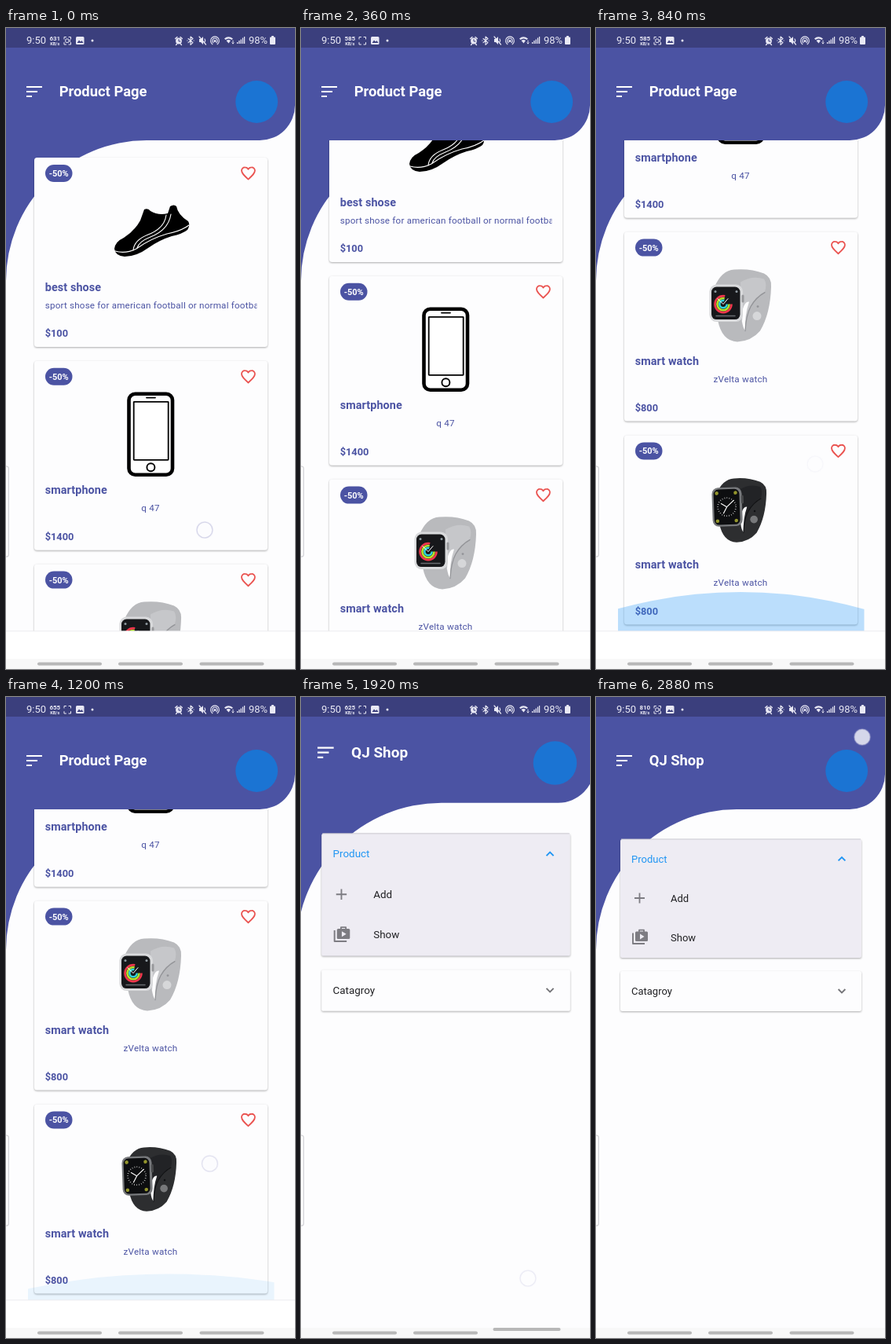
Animation of 368x816 px, one loop 3000 ms. Source, as an HTML page:

```html
<!DOCTYPE html>
<html lang="en">
<head>
<meta charset="utf-8">
<title>Shop app</title>
<style>
html, body { margin: 0; width: 100%; height: 100%; overflow: hidden; background: #fdfdfe; }
svg { display: block; width: 368px; height: 816px; font-family: Roboto, sans-serif; }
.b { font-weight: 700; }
.ink { fill: #4b53a3; }
.note { letter-spacing: .2px; }
.name { letter-spacing: .1px; }
.line { fill: none; stroke-linecap: round; stroke-linejoin: round; }
.raised { filter: drop-shadow(0 1.5px 1.2px rgba(0,0,0,.32)); }
</style>
</head>
<body>
<svg id="stage" viewBox="0 0 368 816"></svg>
<script>
const STEP = 120, LOOP = 3000, PITCH = 258.8;
const INDIGO = '#4b53a3', PAPER = '#fdfdfe';

const text = (x, y, size, s, attrs = '') => `<text x="${x}" y="${y}" font-size="${size}" ${attrs}>${s}</text>`;
const rect = (x, y, w, h, r, attrs = '') => `<rect x="${x}" y="${y}" width="${w}" height="${h}" rx="${r}" ${attrs}/>`;
const disc = (x, y, r, attrs = '') => `<circle cx="${x}" cy="${y}" r="${r}" ${attrs}/>`;
const line = (d, color, w, attrs = '') => `<path d="${d}" class="line" stroke="${color}" stroke-width="${w}" ${attrs}/>`;

const header = title => `
  <rect width="368" height="330" fill="${INDIGO}"/>
  <path d="M0 322A179 179 0 0 1 179 143H323.200A44.800 44.800 0 0 0 368 98.200V816H0Z" fill="${PAPER}"/>
  <path d="M26 75H46M26 81H40M26 87H33" stroke="#fff" stroke-width="2.2"/>
  ${text(67.7, 87, 18.4, title, 'class="b" fill="#fff"')}
  ${disc(319.2, 94, 26.9, 'fill="#1b74d3"')}`;

// Product pictures, in card coordinates
const shoe = `
  <path d="M138 116Q139 107 150 102Q164 93 171 80L176 66Q181 64 184 68Q194 74 206 71L209 62Q214 59 217 62
    Q219 73 232 81Q235 86 231 92Q225 97 211 100Q195 105 181 115Q166 126 151 126Q139 125 138 116Z"/>
  ${line('M139 119Q152 123 166 116Q184 103 205 97Q222 94 233 86', '#fff', 1.2)}
  ${line('M162 118Q163 105 181 98Q202 90 204 73M167 115Q169 107 184 101Q207 92 210 72', '#fff', 1.1)}`;

const phone = `
  ${rect(156.5, 42, 55.5, 103, 8, 'fill="#fff" stroke="#000" stroke-width="4.6"')}
  ${rect(162.7, 52, 44, 74, .5, 'fill="#fff" stroke="#000" stroke-width="1.8"')}
  ${line('M179 46.8H190', '#000', 1.8)}
  ${disc(184.4, 135.5, 5, 'fill="none" stroke="#000" stroke-width="1.9"')}`;

const strap = (main, inner, edge, pin) => `
  <path d="M151 70Q160 49 176 48Q196 46 214 53Q224 58 223 70Q222 104 209 126Q198 139 180 140Q160 139 155 112Z" fill="${main}"/>
  <path d="M184 64Q199 55 214 60Q218 66 215 76Q203 82 196 96Q190 109 190 122L185 114Z" fill="${inner}"/>
  <path d="M187 98Q190 88 195 89Q189 106 190 126Q187 122 186 114Z" fill="${PAPER}"/>
  ${line('M190 126Q191 106 197 95Q204 83 215 77', edge, 1.2)}
  ${disc(205, 107, 5.5, `fill="${pin}"`)}${disc(206, 95, 1.4, `fill="${edge}"`)}`;

const ring = (r, color) => disc(162, 92, r, `fill="none" stroke="${color}" stroke-width="2.6" stroke-dasharray="${r * 4.9} 99"`);
const silverWatch = `
  ${strap('#b9babd', '#c6c7ca', '#929397', '#d6d7d9')}
  ${rect(144.5, 67, 42.5, 47.5, 9, 'fill="#d9dadc"')}
  ${rect(147, 70, 36.5, 41.5, 6.5, 'fill="#17181b"')}
  ${ring(10.5, '#f0364c')}${ring(7.6, '#b5e32c')}${ring(4.7, '#2fd5dc')}
  ${line('M155 85L162 92L168 85', '#fff', 1)}
  ${disc(152, 76, 1.5, 'fill="#8f9aa0"')}${disc(179, 76, 1.5, 'fill="#8f9aa0"')}
  ${line('M153 107H177', '#686b70', 1.5)}
  ${rect(185.5, 80, 3, 10, 1.5, 'fill="#999a9d"')}`;

const blackWatch = `<g transform="translate(19.7 12.5) scale(.885)">
  ${strap('#2d2e30', '#222326', '#111214', '#77787a')}
  <g transform="rotate(-2 166 89)">
  ${rect(145, 61, 43, 56, 9, 'fill="#77797c"')}
  ${rect(147.5, 63.5, 37, 51, 7, 'fill="#0d0e10"')}
  ${disc(166, 89, 13, 'fill="none" stroke="#d8d8d8" stroke-width="2" stroke-dasharray=".8 2.6"')}
  ${line('M158 84L166 89L176 80M166 89L161 98', '#fff', 1.3)}
  ${[[152, 69], [179, 69], [152, 109], [179, 109]].map(([x, y]) => disc(x, y, 2.6, 'fill="#94962c"')).join('')}
  ${rect(187, 73, 3.4, 12, 1.7, 'fill="#48494b"')}
  </g></g>`;

const heart = `<g transform="translate(297.2 8.6) scale(.94)">${line(
  'M12 20.3C6 14.8 3 12 3 8.5A4.4 4.4 0 0 1 7.5 4C9.6 4 11.2 5 12 6.6C12.8 5 14.4 4 16.5 4A4.4 4.4 0 0 1 21 8.5C21 12 18 14.8 12 20.3Z',
  '#ea5350', 1.9)}</g>`;

const card = ([name, note, price, art], i) => `<g transform="translate(0 ${165 + i * PITCH})">
  ${rect(36, 0, 297, 241, 3.5, `class="raised" fill="${PAPER}"`)}
  ${rect(50, 9, 34.5, 22, 11, `fill="${INDIGO}"`)}
  ${text(67.2, 24, 11, '-50%', 'class="b" fill="#fff" text-anchor="middle"')}
  ${heart}${art}
  ${text(49.7, 169.5, 14.4, name, 'class="b ink name"')}
  ${note.length > 20
    ? `<g clip-path="url(#note)">${text(49.7, 191.7, 11.65, note, 'class="ink note"')}</g>`
    : text(184, 191.7, 11.65, note, 'class="ink note" text-anchor="middle"')}
  ${text(49.7, 228.3, 12.8, price, 'class="b ink"')}</g>`;

const goods = [
  ['best shose', 'sport shose for american football or normal football', '$100', shoe],
  ['smartphone', 'q 47', '$1400', phone],
  ['smart watch', 'zVelta watch', '$800', silverWatch],
  ['smart watch', 'zVelta watch', '$800', blackWatch]
];

const productPage = `<g id="products">${header('Product Page')}
  <g clip-path="url(#view)"><g id="list">${goods.map(card).join('')}</g>
  <ellipse id="glow" rx="580" fill="#2196f3"/></g>
  <rect y="768" width="368" height="48" fill="#fff"/>
  <path d="M0 767.8H368" stroke="#ededf0"/></g>`;

const homePage = `<g id="home">${header('QJ Shop')}
  ${rect(31, 181, 307, 151, 2.5, 'class="raised" fill="#eeecf3"')}
  <path d="M32 181H337" stroke="#c9c8d0" stroke-width=".9"/>
  ${text(45, 210.7, 13, 'Product', 'fill="#2196f3"')}
  ${line('M308.6 208.4L313 204L317.4 208.4', '#2196f3', 1.9, 'style="stroke-linecap:butt;stroke-linejoin:miter"')}
  <path d="M49 256H62M55.500 249.500V262.500" stroke="#7d7c82" stroke-width="1.8"/>
  ${text(95, 260.500, 13, 'Add', 'fill="#212124"')}
  ${line('M47 300.500V314H62', '#7d7c82', 1.9, 'style="stroke-linecap:butt"')}
  ${rect(50, 298.5, 16, 12.5, 1.5, 'fill="#7d7c82"')}
  ${line('M55 299V296.700H61V299', '#7d7c82', 1.8)}
  <path d="M56 301.500V308.500L61.500 305Z" fill="#eeecf3"/>
  ${text(95, 310.500, 13, 'Show', 'fill="#212124"')}
  ${rect(31, 349, 307, 51, 2.5, `class="raised" fill="${PAPER}"`)}
  ${text(45, 378.5, 13, 'Catagroy', 'fill="#212124"')}
  ${line('M308.6 372L313 376.400L317.4 372', '#757579', 1.9, 'style="stroke-linecap:butt;stroke-linejoin:miter"')}</g>`;

const pale = '#e9e9f5';
const statusBar = `<rect width="368" height="25" fill="#3b3f7d"/>
  <g fill="${pale}">
  ${text(26, 20.3, 13, '9:50')}
  ${text(62.3, 15.8, 8, '', 'id="speed" class="b" text-anchor="middle"')}
  ${text(62.3, 22.3, 5.6, 'KB/s', 'class="b" text-anchor="middle"')}
  ${rect(89, 11, 10.500, 10, 1.5)}
  <path d="M90.500 19L93 15.500L95 17.500L96.500 16L98.500 19Z" fill="#3b3f7d"/>
  ${disc(110, 16, 1.5)}
  ${disc(220, 16.5, 3.9)}
  <path d="M246 14H248L251 11V21L248 18H246Z"/>
  ${disc(266, 16.5, 1.6)}
  <path d="M278 13.500Q283 9 289 13.500L287.500 15Q283.500 12 279.500 15ZM280.500 16Q283.500 14 286 16L283.500 19.500Z"/>
  <path d="M294 20V18H295.300V20ZM296.300 20V16H297.600V20ZM298.600 20V14.500H299.900V20ZM300.900 20V12.500H302.200V20ZM303 20V11H304.200V20Z"/>
  ${text(309, 20.3, 13, '98%')}
  ${rect(336, 11.5, 7, 9.5, 1)}${rect(338, 10, 3, 2, .5)}
  </g>
  ${line('M74 14V11.500H76.500M80 11.500H82.500V14M82.500 18.500V21H80M76.500 21H74V18.500', pale, 1)}
  <g id="rec">${rect(75.8, 14, 4, 4.4, .8, `fill="none" stroke="${pale}"`)}${line('M81.300 15V17.500', pale, 1)}</g>
  ${line('M215.600 13.500L218 11.500M222 11.500L224.400 13.500M217.500 20.500L216.500 21.500M222.500 20.500L223.500 21.500', pale, 1.3)}
  ${line('M220 14.500V17H222', '#3b3f7d', 1)}
  ${line('M232 13.500L238 18.700L235 21.300V11L238 13.500L232 18.700M230.800 16H231M239 16H239.200', pale, 1.1)}
  ${line('M246 11L254.500 21M253 14Q254.500 16 253 18', pale, 1.2)}
  ${line('M262.900 20.700A5.400 5.400 0 1 1 269.100 20.700M264 18.700A3.200 3.200 0 1 1 268 18.700', pale, 1.1)}
  ${line('M289 16V20M287.800 18.800L289 20L290.200 18.800', pale, .9)}`;

const navBar = `<rect y="803" width="368" height="13" fill="#f8f8f8"/>
  ${rect(40, 807.6, 82, 4, 2, 'fill="#b8b8b8"')}${rect(143, 807.6, 82, 4, 2, 'fill="#b8b8b8"')}
  <rect id="back" height="4" rx="2" fill="#b8b8b8"/>`;

const stage = document.getElementById('stage');
stage.innerHTML = `<defs>
  <clipPath id="view"><rect x="28" y="143" width="313.500" height="625"/></clipPath>
  <clipPath id="note"><rect x="49" y="175" width="270.500" height="30"/></clipPath></defs>
  ${homePage}${productPage}${navBar}${statusBar}
  ${rect(-6, 558, 9.3, 115, 2.5, 'fill="#fff" stroke="#cfcfd4" stroke-width="1.2"')}
  <g id="touch">${disc(0, 0, 11.2, 'fill="#b9b9e0" opacity=".14"')}
  ${disc(0, 0, 9.9, 'fill="#fff" fill-opacity=".75" stroke="#bcbcda" stroke-opacity=".55" stroke-width="1.3"')}</g>`;

const el = {};
stage.querySelectorAll('[id]').forEach(n => el[n.id] = n);
const set = (n, attrs) => { for (const k in attrs) n.setAttribute(k, attrs[k]); };

// Interpolates rows of [step, ...values]; holds the last row.
function track(rows, s) {
  let i = rows.findIndex(r => r[0] > s);
  if (i < 0) return rows[rows.length - 1].slice(1);
  if (i === 0) return rows[0].slice(1);
  const a = rows[i - 1], b = rows[i], k = (s - a[0]) / (b[0] - a[0]);
  return a.slice(1).map((v, j) => v + (b[j + 1] - v) * k);
}

const scroll = [[0, 0], [1, 22], [2, 66], [3, 108], [4, 131], [5, 142], [6, 262], [7, 423]];
const glow = [[6, 0, 0, 184], [7, 50, .3, 184], [9, 26, .06, 190], [10, 33.5, .09, 207], [11, 29, .05, 210], [12, 0, 0, 210]];
const zoom = [[15, 1.05], [16, 1.0315], [17, 1.003], [18, 1]];
// Each swipe: step, x, y, opacity
const swipes = [
  [[0, 253, 639, 1], [1, 255, 617, 1], [2, 259, 585, .75]],
  [[5, 254, 645, 1], [6, 265, 597, .9], [7, 279, 555, .15]],
  [[9, 256, 640, 1], [10, 259.5, 594, .7], [11, 268, 545, .2]],
  [[15, 288, 788, 1], [16, 289, 740, .45]],
  [[22, 346, 195, 1], [23, 343, 115, 1], [24, 339, 51, 1]]
];
const speeds = [[0, 631], [2, 585], [9, 655], [15, 625], [20, 810]];
// Steps in which the recording icon blinks on
const blinks = [[0, 1], [5, 7], [12, 14], [20, 24]];

function draw(ms) {
  const s = Math.floor(ms % LOOP / STEP);
  const home = s >= 16;
  el.products.style.display = home ? 'none' : '';
  el.home.style.display = home ? '' : 'none';
  el.list.setAttribute('transform', `translate(0 ${-track(scroll, s)[0]})`);

  const [h, alpha, cx] = track(glow, s), ry = 11.6 * h;
  set(el.glow, { cx, cy: 768 - h + ry, ry, opacity: alpha });

  const z = track(zoom, s)[0];
  el.home.setAttribute('transform', `translate(184 408) scale(${z}) translate(-184 -408)`);

  const pressed = s === 15 || s === 16;
  set(el.back, pressed ? { x: 244.5, y: 803, width: 86 } : { x: 246.5, y: 807.6, width: 82 });

  const swipe = swipes.find(w => s >= w[0][0] && s <= w[w.length - 1][0]);
  el.touch.style.display = swipe ? '' : 'none';
  if (swipe) {
    const [x, y, opacity] = track(swipe, s);
    set(el.touch, { transform: `translate(${x} ${y})`, opacity });
  }
  el.speed.textContent = speeds.filter(r => r[0] <= s).pop()[1];
  el.rec.style.display = blinks.some(([a, b]) => s >= a && s <= b) ? '' : 'none';
}

const start = performance.now();
function tick() {
  draw(performance.now() - start);
  requestAnimationFrame(tick);
}
tick();
</script>
</body>
</html>
```
